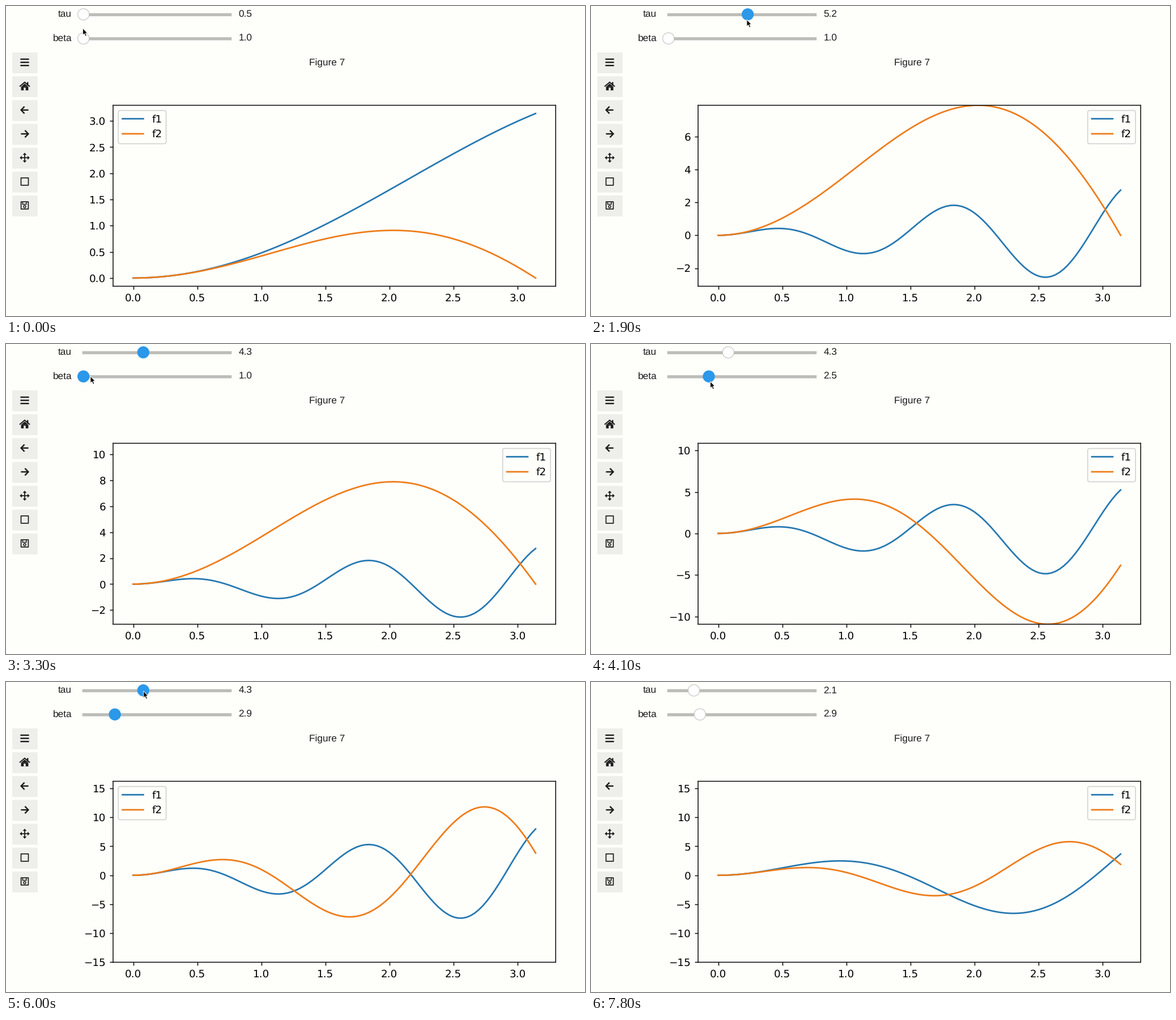
A matplotlib script that plays this animation: 1022x548 px, repeating every 7.9 s.

```python
import math

import matplotlib.pyplot as plt
import numpy as np
from matplotlib.animation import FuncAnimation
from matplotlib.patches import Circle, Polygon, Rectangle

W, H, DPI = 1022, 548, 128
PX = 72 / DPI            # one pixel in points
EM = 18.4 * PX           # plot font size
S = EM / 10              # plot scale against the default style
FRAMES, STEP_MS = 79, 100

BG, INK, BUTTON = "#fefffb", "#1b1b1b", "#eeeeeb"
TRACK, ACTIVE = "#bcbcb9", "#2b98e9"

plt.rcParams.update({
    "font.family": "DejaVu Sans", "font.size": EM, "text.hinting": "none",
    "figure.facecolor": BG, "axes.facecolor": BG, "path.snap": False,
    "axes.linewidth": 0.8 * S, "lines.linewidth": 1.5 * S,
    "patch.linewidth": 1.0 * S, "toolbar": "None",
})
for tick in ("xtick.major.", "ytick.major."):
    plt.rcParams.update({tick + "size": 3.5 * S, tick + "pad": 3.5 * S,
                         tick + "width": 0.8 * S})

TAUS = np.linspace(0.5, 10, 100)
BETAS = np.linspace(1, 10, 100)
X = np.linspace(0, math.pi, 100)
TAU_Y, BETA_Y = 14.8, 57.3
LABEL_LAG, PLOT_LAG = 1, 3
HELD = {13, 44, 54}      # screen stalls for one step
POINTER_GONE = 73


def steady(u):
    return u


def slow_down(u):
    return 1 - (1 - u) ** 2


def speed_up(u):
    return u ** 1.87


# Drag strokes: first step, last step, slider index reached, easing
TAU_DRAG = ((7, 11, 19, slow_down), (11, 20, 57, steady),
            (20, 23, 46, slow_down), (25, 29, 40, slow_down),
            (62, 67, 17, slow_down))
BETA_DRAG = ((37, 40, 17.2, slow_down), (40, 47, 54, slow_down),
             (48, 52, 25.6, speed_up), (52, 53, 19, steady),
             (53, 55, 21, steady))


def progress(step, start, end):
    return min(max((step - start) / (end - start), 0), 1)


def index(drag, step):
    pos = 0
    for start, end, goal, ease in drag:
        pos += (goal - pos) * ease(progress(step, start, end))
    return round(pos)


def tau_beta(step):
    return TAUS[index(TAU_DRAG, step)], BETAS[index(BETA_DRAG, step)]


def curves(step):
    tau, beta = tau_beta(step - PLOT_LAG)
    return X * beta * np.sin(X * tau), X * tau * np.sin(X * beta)


def growing_limits():
    lo, hi = -0.05 * math.pi, 1.05 * math.pi
    limits = []
    for step in range(FRAMES):
        data = np.concatenate(curves(step))
        lo, hi = min(lo, data.min()), max(hi, data.max())
        limits.append((lo, hi))
    return limits


def glide(step, start, end, a, b):
    return np.add(a, np.subtract(b, a) * progress(step, start, end))


def pointer(step, tau_x, beta_x):
    on_tau = tau_x - 1.7, 24
    on_beta = beta_x + 2.5, 66 - 6 * progress(step, 41, 52)
    back = tau_x + 0.3, 16
    if step < 29:
        return glide(step, 0, 4, (135.5, 39.3), on_tau)
    if step < 35:
        return glide(step, 29, 33, on_tau, (149, 57))
    if step < 37:
        return np.array((141, 58))
    if step < 67:
        return glide(step, 55, 60, on_beta, back)
    return glide(step, 67, 72, back, (97, -6))


def focused(step):
    if 7 <= step < 37 or 62 <= step < 78:
        return "tau"
    return "beta" if 37 <= step < 62 else None


fig = plt.figure(figsize=(W / DPI, H / DPI), dpi=DPI)

# Pixel canvas for the widgets
ui = fig.add_axes([0, 0, 1, 1])
ui.set_xlim(0, W)
ui.set_ylim(H, 0)
ui.axis("off")


def box(x, y, w, h, color=INK):
    ui.add_patch(Rectangle((x, y), w, h, fc=color, lw=0))


def frame(x, y, size):
    ui.add_patch(Rectangle((x - size / 2, y - size / 2), size, size, fill=False,
                           ec=INK, lw=1.7 * PX, joinstyle="round"))


def shape(points):
    ui.add_patch(Polygon(points, fc=INK, lw=0))


def stroke(points, width=2.4):
    xs, ys = zip(*points)
    ui.plot(xs, ys, color=INK, lw=width * PX, solid_joinstyle="miter",
            solid_capstyle="butt")


def label(x, baseline, text, align="left"):
    return ui.text(x, baseline, text, ha=align, va="baseline", color=INK,
                   family="Liberation Sans", fontsize=17.24 * PX)


def menu_icon(x, y):
    for dy in (-5.6, 0, 5.6):
        stroke([(x - 7.6, y + dy), (x + 7.6, y + dy)])


def home_icon(x, y):
    stroke([(x - 9, y + 0.6), (x, y - 7), (x + 9, y + 0.6)], 2)
    box(x + 4, y - 7.2, 2.4, 6)
    shape([(x - 6.4, y + 0.9), (x, y - 4.6), (x + 6.4, y + 0.9)])
    box(x - 6.4, y + 0.8, 12.8, 6.6)
    box(x - 1.8, y + 2.6, 3.6, 5, BUTTON)


def arrow_icon(x, y, way):
    stroke([(x - 6.6 * way, y), (x + 6 * way, y)])
    stroke([(x + 0.4 * way, y - 6.2), (x + 6.4 * way, y),
            (x + 0.4 * way, y + 6.2)])


def back_icon(x, y):
    arrow_icon(x, y, -1)


def forward_icon(x, y):
    arrow_icon(x, y, 1)


def move_icon(x, y):
    for dx, dy in ((1, 0), (-1, 0), (0, 1), (0, -1)):
        stroke([(x, y), (x + 6 * dx, y + 6 * dy)], 1.8)
        shape([(x + 8.8 * dx, y + 8.8 * dy),
               (x + 5 * dx + 3.4 * dy, y + 5 * dy + 3.4 * dx),
               (x + 5 * dx - 3.4 * dy, y + 5 * dy - 3.4 * dx)])


def zoom_icon(x, y):
    frame(x, y, 13)


def save_icon(x, y):
    frame(x, y, 12.8)
    stroke([(x - 3.6, y - 6), (x - 3.6, y - 2), (x + 2.8, y - 2),
            (x + 2.8, y - 6)], 1.5)
    ui.add_patch(Circle((x, y + 2.2), 2, fill=False, ec=INK, lw=1.5 * PX))


icons = (menu_icon, home_icon, back_icon, forward_icon, move_icon, zoom_icon,
         save_icon)
for row, icon in enumerate(icons):
    top = 82 + 42.15 * row
    box(11, top, 44.8, 37, BUTTON)
    icon(33, top + 17.6)

label(567, 104.7, "Figure 7", "center")


def slider(name, y):
    box(134.7, y - 2.1, 263.5, 5.4, TRACK)
    label(116.2, y + 4.9, name, "right")
    knob = ui.add_patch(Circle((0, y), 10.1, lw=1.1 * PX, zorder=4))
    return knob, label(410.6, y + 4.9, "")


tau_knob, tau_text = slider("tau", TAU_Y)
beta_knob, beta_text = slider("beta", BETA_Y)

ARROW = np.array([(0, 0), (0, 12), (2.7, 9.6), (4.8, 14.2), (6.9, 13.2),
                  (4.9, 8.8), (8.4, 8.6)])
arrow = ui.add_patch(Polygon(ARROW, fc="#0a0a0a", ec="white", lw=0.9 * PX,
                             zorder=6))

# Plot area
LEFT, RIGHT, TOP, BOTTOM = 189, 970.3, 175.5, 495.4
ax = fig.add_axes([LEFT / W, 1 - BOTTOM / H, (RIGHT - LEFT) / W,
                   (BOTTOM - TOP) / H])
ax.set_xlim(-0.05 * math.pi, 1.05 * math.pi)
line1, = ax.plot(X, X, color="#2678b1", label="f1")
line2, = ax.plot(X, X, color="#ee7c1a", label="f2")
ax.legend(loc="best")
LIMITS = growing_limits()


def paint_knob(knob, x, y, active):
    knob.center = (x, y)
    knob.set_facecolor(ACTIVE if active else "white")
    knob.set_edgecolor(ACTIVE if active else "#c2c2bf")


def knob_x(drag, step):
    return 136.7 + 2.64 * index(drag, step)


def update(i):
    step = i - 1 if i in HELD else i
    tau_x, beta_x = knob_x(TAU_DRAG, step), knob_x(BETA_DRAG, step)
    tip = pointer(step, tau_x, beta_x)
    shown = step < POINTER_GONE
    arrow.set_visible(shown)
    arrow.set_xy(ARROW + tip)

    for name, knob, x, y in (("tau", tau_knob, tau_x, TAU_Y),
                             ("beta", beta_knob, beta_x, BETA_Y)):
        hover = shown and math.hypot(tip[0] - x, tip[1] - y) < 14
        paint_knob(knob, x, y, hover or focused(step) == name)

    tau, beta = tau_beta(step - LABEL_LAG)
    tau_text.set_text(f"{tau:.1f}")
    beta_text.set_text(f"{beta:.1f}")

    f1, f2 = curves(step)
    line1.set_ydata(f1)
    line2.set_ydata(f2)
    ax.set_ylim(*LIMITS[step])
    return []


anim = FuncAnimation(fig, update, frames=FRAMES, interval=STEP_MS,
                     repeat=True, repeat_delay=0, blit=False)
plt.show()
```
